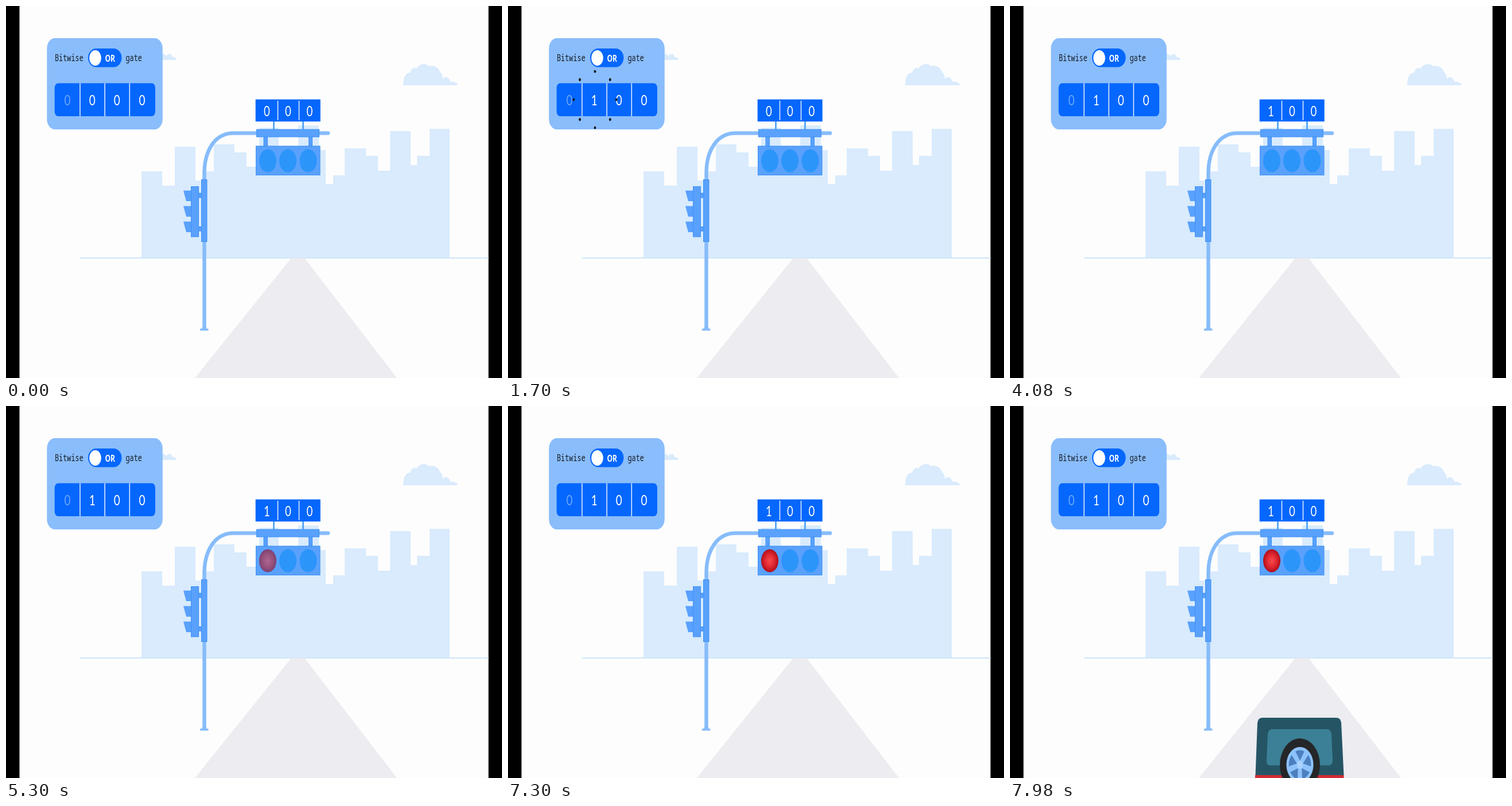
Write an HTML page that moves like this. It is 864 px wide and 648 px high and loops after 8 s.

```html
<!DOCTYPE html>
<html lang="en">
<head>
<meta charset="utf-8">
<title>Bitwise traffic light</title>
<style>
html, body { margin: 0; width: 100%; height: 100%; overflow: hidden; background: #000; }
svg { display: block; width: 100vw; height: 100vh; }
text { font-family: "Noto Sans", sans-serif; fill: #fff; text-anchor: middle; }
.label { font: 15.6px "Noto Sans Mono", monospace; fill: #161c26; text-anchor: start; }
.digit { font-family: Lato, sans-serif; }
.city { fill: #d9ebfd; }
.pole { fill: none; stroke: #86bcfa; }
.steel { fill: #59a1fd; stroke: #3f91f4; stroke-width: 1; }
.deep { fill: #0567fd; }
.rule { stroke: #dcebff; stroke-width: 1.6; }
.burst line { stroke: #17191d; stroke-width: 5.2; stroke-linecap: round; }
</style>
</head>
<body>
<svg viewBox="0 0 864 648" preserveAspectRatio="none">
  <defs>
    <radialGradient id="glow">
      <stop offset="0" stop-color="#f8494c"/>
      <stop offset=".5" stop-color="#e32c34"/>
      <stop offset="1" stop-color="#b20d1a"/>
    </radialGradient>
    <clipPath id="stage"><rect x="23.5" width="817" height="648"/></clipPath>
  </defs>
  <rect width="864" height="648"/>
  <g clip-path="url(#stage)">
    <rect width="864" height="648" fill="#fdfdfd"/>

    <g class="city">
      <path d="M236 439V288H272V313H294V245H330V304H345V288H362V241H398V255H419V280H441V212H475V280H509V208H545V251H557V310H570V295H590V248H627V261H648V287H669V218H705V277H716V261H738V214H773V439Z"/>
      <path d="M692 138C692 125 695 117 704 116C707 107 712 107 715 109C720 100 732 99 737 105C746 102 754 108 756 115C760 118 761 123 761 127C766 121 773 125 774 132C780 131 787 134 787 138Z"/>
      <path d="M260 94C262 84 273 78 279 87C284 81 289 83 290 89C294 89 297 91 297 94Z"/>
    </g>
    <path d="M129 439H841" stroke="#cfe6fb" stroke-width="2"/>
    <path d="M497 439H520L681 648H329Z" fill="#ececf1"/>

    <path class="pole" d="M345.5 560V290C346 250 365 221.500 396 221.500H561" stroke-width="6.500" stroke-linecap="round"/>
    <path d="M338 565.500V562H341L343 558H348L350 562H352.500V565.500Z" fill="#86bcfa"/>
    <g class="steel">
      <path d="M335 326H341V334H335ZM335 384.500H341V392H335Z"/>
      <path d="M309 321.500H322V340H314ZM309 348.500H322V367H314ZM309 375.500H322V394H314Z" stroke="none"/>
      <rect x="322.500" y="314.500" width="13" height="87.500"/>
      <rect x="340.500" y="302.500" width="9.500" height="108"/>
      <path d="M449 228H455.500V244H449ZM527.500 228H533.500V244H527.500Z"/>
      <rect x="436.500" y="215" width="109" height="13"/>
      <rect x="435.500" y="244" width="111.500" height="50.500"/>
    </g>
    <path d="M466.500 200V215M517.500 200V215" stroke="#459ff8" stroke-width="2.600"/>
    <g fill="#2c95fa">
      <ellipse cx="456" cy="269.500" rx="15" ry="20"/>
      <ellipse cx="491" cy="269.500" rx="15" ry="20"/>
      <ellipse cx="526.500" cy="269.500" rx="15" ry="20"/>
    </g>
    <ellipse id="red" cx="456" cy="269.500" rx="15" ry="20" fill="url(#glow)"/>

    <rect class="deep" x="434.700" y="162.700" width="113" height="38.500"/>
    <path class="rule" d="M473.500 165V199M510.500 165V199"/>

    <rect x="71.300" y="56" width="201.500" height="159" rx="14" ry="18" fill="#8abdfb"/>
    <rect class="deep" x="143" y="74" width="58.500" height="32.500" rx="14" ry="16.200"/>
    <ellipse cx="155.500" cy="90.500" rx="10.300" ry="13.500" fill="#fff"/>
    <rect class="deep" x="84.700" y="134.500" width="175.300" height="57.500" rx="6" ry="8"/>
    <path class="rule" d="M129 134.500V192M172.200 134.500V192M215.300 134.500V192"/>
    <g id="words"></g>

    <g id="car">
      <path d="M440 543H568Q576 543 577 552L581.500 644H427.500L431 552Q432 543 440 543Z" fill="#255565"/>
      <path d="M457 563H552Q559 563 560 572L562 617Q562 626 555 626H454Q446 626 447 617L449 572Q450 563 457 563Z" fill="#3b8096"/>
      <rect x="427" y="643" width="154.500" height="60" fill="#d02b36"/>
      <g transform="translate(505 625) scale(.76 1)">
        <circle r="46" fill="#252628"/>
        <circle r="31" fill="#8dc2fc"/>
        <circle r="25.500" fill="#4c7fbd"/>
        <g id="spokes" fill="#8dc2fc"></g>
        <circle r="7" fill="#a9d2ff"/>
      </g>
    </g>
    <g id="bursts"></g>
  </g>
</svg>
<script>
const LOOP = 8000, SQUEEZE = 0.76, REACH = 49;
const byId = id => document.getElementById(id);
const progress = (t, from, to) => Math.max(0, Math.min(1, (t - from) / (to - from)));
const easeOut = p => 1 - (1 - p) ** 2;

function add(parent, tag, attrs, content = '') {
  const node = document.createElementNS('http://www.w3.org/2000/svg', tag);
  for (const key in attrs) node.setAttribute(key, attrs[key]);
  node.textContent = content;
  return parent.appendChild(node);
}

// The whole picture is narrower than it was drawn, lettering included.
const place = (x, y) => `translate(${x} ${y}) scale(${SQUEEZE} 1)`;
const write = (content, x, y, attrs) =>
  add(byId('words'), 'text', { transform: place(x, y), ...attrs }, content);
const writeDigit = (x, y, size, opacity = 1) =>
  write('0', x, y, { class: 'digit', 'font-size': size, opacity });

write('Bitwise', 85, 96, { class: 'label' });
write('gate', 208.5, 96, { class: 'label' });
write('OR', 181.3, 96.5, { 'font-size': 16, 'font-weight': 600 });
const panel = [107, 150.3, 193.3, 237].map((x, i) => writeDigit(x, 172.7, 25, i ? 1 : 0.4));
const sign = [454.3, 491.5, 529].map(x => writeDigit(x, 192, 24.5));

for (let i = 0; i < 5; i++)
  add(byId('spokes'), 'path', { d: 'M-4 0L-5.500 -28H5.500L4 0Z', transform: `rotate(${i * 72 + 36})` });

const bursts = [
  { x: 151.5, y: 163, start: 1200, digit: panel[1] },
  { x: 455, y: 183, start: 2950, digit: sign[0] }
].map(burst => {
  const group = add(byId('bursts'), 'g', { class: 'burst', transform: place(burst.x, burst.y) });
  const rays = Array.from({ length: 8 }, (_, i) =>
    add(group, 'line', { transform: `rotate(${i * 45})` }));
  return { ...burst, group, rays };
});

function drawBurst({ start, digit, group, rays }, t) {
  const age = t - start;
  const tip = REACH * easeOut(progress(age, 0, 240));
  const tail = REACH * progress(age, 270, 470);
  group.style.display = age >= 0 && age < 600 ? '' : 'none';
  for (const ray of rays) {
    ray.setAttribute('y1', -tail);
    ray.setAttribute('y2', -tip - 0.01);
  }
  digit.textContent = age >= 100 ? '1' : '0';
}

function draw(t) {
  bursts.forEach(burst => drawBurst(burst, t));
  byId('red').style.opacity = progress(t, 4800, 5620);
  byId('car').setAttribute('transform', `translate(0 ${110 * (1 - progress(t, 7580, 7980))})`);
}

const begin = performance.now();
function tick() {
  draw((performance.now() - begin) % LOOP);
  requestAnimationFrame(tick);
}
tick();
</script>
</body>
</html>
```
